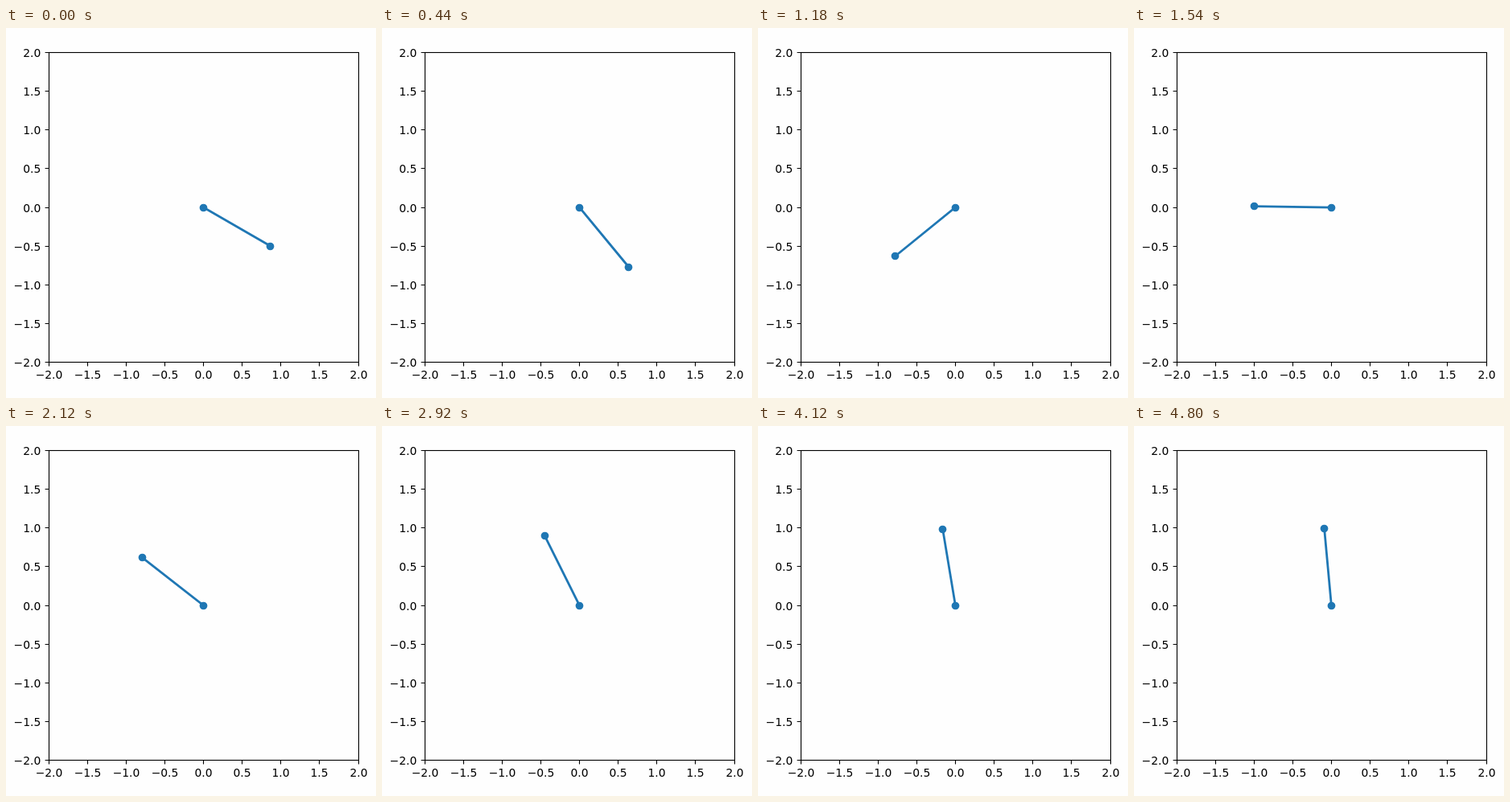
Recreate the animation shown at these times as an HTML page. Size 460x460 px, loop 4.82 s.

```html
<!DOCTYPE html>
<html lang="en">
<head>
<meta charset="utf-8">
<title>Pendulum plot</title>
<style>
  html, body { margin: 0; width: 100%; height: 100%; overflow: hidden; background: #fefefe; }
  svg { display: block; width: 460px; height: 460px; }
  text { font: 13.89px "DejaVu Sans", sans-serif; fill: #000; }
  .axes { fill: none; stroke: #000; stroke-width: 1.11; }
  .rod { stroke: #1f77b4; stroke-width: 2.78; stroke-linecap: square; }
  .dot { fill: #1f77b4; }
</style>
</head>
<body>
<svg viewBox="0 0 460 460">
  <g id="axes" class="axes"><rect x="53.5" y="30.5" width="385" height="385"/></g>
  <g id="labels"></g>
  <line id="rod" class="rod"/>
  <circle id="pivot" class="dot" r="4.86"/>
  <circle id="bob" class="dot" r="4.86"/>
</svg>
<script>
const LOOP = 4820, STEP = 20;
const UNIT = 96.25, CX = 245.4, CY = 223;
const $ = id => document.getElementById(id);
const snap = v => Math.floor(v) + 0.5;

function add(parent, tag, attrs, text) {
  const el = document.createElementNS("http://www.w3.org/2000/svg", tag);
  set(el, attrs);
  if (text) el.textContent = text;
  parent.appendChild(el);
}

function set(el, attrs) {
  for (const k in attrs) el.setAttribute(k, attrs[k]);
}

function drawAxes() {
  for (let i = 0; i <= 8; i++) {
    const v = i / 2 - 2;
    const label = (v < 0 ? "\u2212" : "") + Math.abs(v).toFixed(1);
    const x = snap(53 + i * UNIT / 2), y = snap(415.5 - i * UNIT / 2);
    add($("axes"), "path", { d: `M${x} 415.5V420.4M53.5 ${y}H48.6` });
    add($("labels"), "text", { x, y: 436, "text-anchor": "middle" }, label);
    add($("labels"), "text", { x: 43.3, y: y + 5.5, "text-anchor": "end" }, label);
  }
}

// Seconds, degrees left to upright, closing speed in degrees per second
const KEYS = [
  [0, 240, 0], [0.27, 232.2, 57.5], [0.54, 209.8, 105.5], [0.82, 175.8, 132],
  [1.08, 141.5, 125], [1.62, 82.5, 76], [2.16, 50.2, 43.2], [2.7, 32, 27.5]
];
const DECAY = 0.86;

function angleLeft(t) {
  const i = KEYS.findIndex(k => k[0] > t);
  if (i < 0) {
    const [t0, a0] = KEYS[KEYS.length - 1];
    return a0 * Math.exp(-DECAY * (t - t0));
  }
  const [t0, a0, v0] = KEYS[i - 1], [t1, a1, v1] = KEYS[i];
  const h = t1 - t0, u = (t - t0) / h, w = 1 - u;
  return a0 * w * w * (1 + 2 * u) + a1 * u * u * (1 + 2 * w)
    - h * u * w * (v0 * w - v1 * u);
}

function render(ms) {
  const t = Math.floor((ms % LOOP) / STEP) * STEP / 1000;
  const a = angleLeft(t) * Math.PI / 180;
  const x = CX - UNIT * Math.sin(a), y = CY - UNIT * Math.cos(a);
  set($("rod"), { x1: CX, y1: CY, x2: x, y2: y });
  set($("bob"), { cx: snap(x), cy: snap(y) });
}

drawAxes();
set($("pivot"), { cx: snap(CX), cy: snap(CY) });
render(0);

let start;
function tick(now) {
  start ??= now;
  render(now - start);
  requestAnimationFrame(tick);
}
requestAnimationFrame(tick);
</script>
</body>
</html>
```
